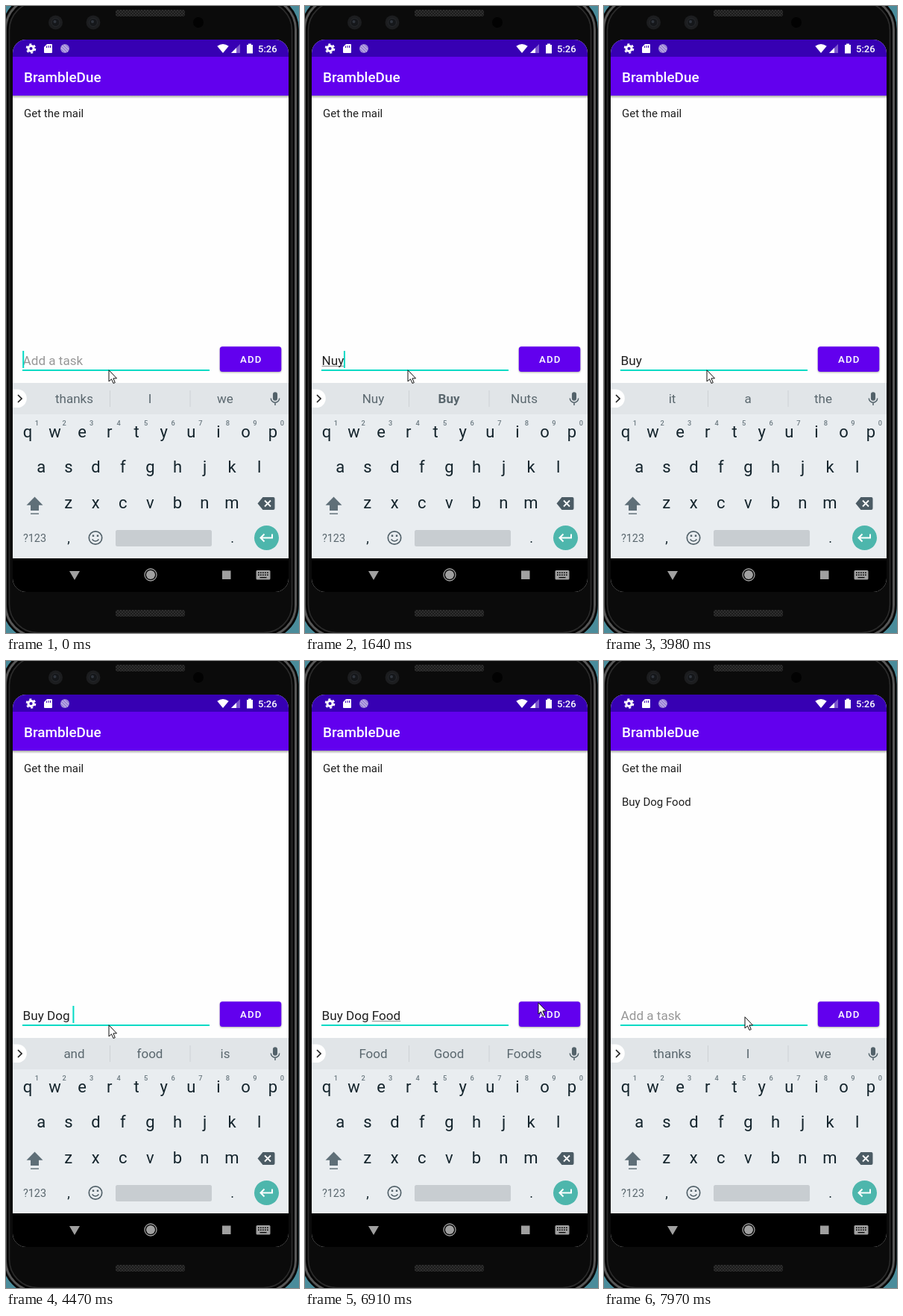
Recreate the animation shown at these times as an HTML page. Size 393 px wide and 840 px high, loop 8000 ms.

```html
<!DOCTYPE html>
<html lang="en">
<head>
<meta charset="utf-8">
<title>Task list</title>
<style>
  html, body { margin: 0; width: 100%; height: 100%; overflow: hidden; background: #4a8c9b; }
  svg { display: block; width: 100vw; height: 100vh; }
  text { font-family: Roboto, sans-serif; white-space: pre; }
  .mid { text-anchor: middle; }
  .item { font-size: 15px; fill: #1f1f1f; }
  .field { font-size: 17.1px; }
  .sug { font-size: 17px; fill: #5a676e; }
  .key { font-size: 22px; fill: #14242c; }
  .mark { font-size: 18px; fill: #14242c; }
  .digit { font-size: 9.3px; font-weight: 500; fill: #6b7980; }
</style>
</head>
<body>
<svg id="stage" viewBox="0 0 393 840">
  <defs>
    <clipPath id="screen"><rect x="9" y="45" width="370" height="740" rx="18"/></clipPath>
    <clipPath id="btnClip"><rect x="286.8" y="456.2" width="82.5" height="33.8" rx="3.5"/></clipPath>
    <linearGradient id="barShade" x2="0" y2="1">
      <stop offset="0" stop-opacity=".35"/><stop offset="1" stop-opacity="0"/>
    </linearGradient>
    <pattern id="mesh" width="4" height="4" patternUnits="userSpaceOnUse">
      <rect width="4" height="4" fill="#1b1b1b"/>
      <path d="M0 0L4 4M4 0L0 4" stroke="#343434" stroke-width=".8"/>
    </pattern>
  </defs>

  <!-- phone body -->
  <rect width="393" height="840" fill="#4a8c9b"/>
  <g stroke-width="1.5">
    <rect x="-4" y="-14" width="396" height="862" rx="45" fill="#0b0b0b" stroke="#050505"/>
    <rect x="-.5" y="-10.5" width="389" height="855" rx="42" fill="none" stroke="#565656" stroke-width="3"/>
    <rect x="2" y="-8" width="384" height="850" rx="40" fill="none" stroke="#000"/>
    <rect x="4.5" y="-5.5" width="379" height="845" rx="38" fill="none" stroke="#2c2c2c"/>
  </g>
  <rect x="147" y="5" width="93" height="9" rx="3" fill="url(#mesh)"/>
  <rect x="147" y="809" width="93" height="9" rx="3" fill="url(#mesh)"/>
  <g id="lenses"></g>
  <circle cx="258" cy="22" r="7" fill="#020202"/>

  <g clip-path="url(#screen)">
    <rect x="9" y="45" width="370" height="740" fill="#fefefe"/>
    <rect x="9" y="120" width="370" height="4" fill="url(#barShade)"/>
    <rect x="9" y="45" width="370" height="23" fill="#3700b3"/>
    <rect x="9" y="68" width="370" height="52" fill="#6200ee"/>

    <!-- status bar -->
    <g fill="#fff">
      <circle cx="33.5" cy="57" r="3.6" fill="none" stroke="#fff" stroke-width="3"/>
      <circle cx="33.5" cy="57" r="5.8" fill="none" stroke="#fff" stroke-width="2" stroke-dasharray="3.04 3.04"/>
      <path d="M55 51h6q1 0 1 1v10q0 1-1 1h-9q-1 0-1-1V55z"/>
      <path d="M54.5 53.5v2.5M57 53v3M59.5 53v3" stroke="#3700b3"/>
      <circle cx="79" cy="57" r="6" fill="#9c86d6"/>
      <path d="M75 53l8 8M74 56l6 6M78 52l6 6" stroke="#cabdec" stroke-width="1"/>
      <path d="M291 63L283.3 53.8Q291 48 298.7 53.8z"/>
      <path d="M302 63L314 51V63z" opacity=".35"/>
      <path d="M302 63L309 56V63z"/>
      <path d="M325 50.5h4v1.5h2v11.5h-8V52h2z"/>
      <text x="338" y="61.5" font-size="13" font-weight="500">5:26</text>
    </g>
    <text x="24" y="102" font-size="18.9" font-weight="500" fill="#fff">BrambleDue</text>

    <!-- list and form -->
    <text class="item" x="24" y="149">Get the mail</text>
    <text class="item" x="24" y="194" id="added">Buy Dog Food</text>
    <rect x="22" y="487" width="251" height="2" fill="#03dac5"/>
    <text class="field" x="22.6" y="480.5" id="field"></text>
    <rect id="compose" y="482" height="1" fill="#333" opacity=".55"/>
    <rect id="caret" y="462" width="2" height="23" fill="#03dac5"/>
    <rect id="btn" x="286.8" y="456.2" width="82.5" height="33.8" rx="3.5" fill="#6200ee"/>
    <g clip-path="url(#btnClip)"><circle id="ripple" cx="313" cy="460" fill="#fff"/></g>
    <text x="314" y="478" font-size="13.2" font-weight="500" letter-spacing="1.15" fill="#fff">ADD</text>

    <!-- keyboard -->
    <rect x="9" y="505" width="370" height="235" fill="#e9edf0"/>
    <rect x="9" y="505" width="370" height="42" fill="#e1e5e8"/>
    <path d="M139.5 515v22M247 515v22" stroke="#cdd2d5"/>
    <path d="M9 513.5h6.5a12.3 12.3 0 0 1 0 24.6H9z" fill="#fff"/>
    <path d="M16 521l5 5-5 5" fill="none" stroke="#222" stroke-width="1.7"/>
    <g id="sugs"></g>
    <g fill="none" stroke="#53626a" stroke-width="1.5">
      <rect x="358.7" y="518" width="4.6" height="10" rx="2.3" fill="#53626a"/>
      <path d="M355.3 525.5a5.7 5.7 0 0 0 11.4 0M361 531v4"/>
    </g>
    <g id="keys"></g>
    <g id="shift">
      <path d="M38.5 657.5L49.5 668.8H44V676H33V668.8H27.5z"/>
      <rect x="33" y="679.5" width="11" height="1.5" fill="#66757d"/>
    </g>
    <path d="M344.5 658H358.5Q360.5 658 360.5 660V673Q360.5 675 358.5 675H344.5L337.5 666.5z" fill="#4b5b64"/>
    <path d="M347 662.5l8 8M355 662.5l-8 8" stroke="#fff" stroke-width="1.8"/>
    <text class="mid" x="38.5" y="718" font-size="14.4" fill="#5a676e">?123</text>
    <text class="mark mid" x="84" y="719">,</text>
    <text class="mark mid" x="303.5" y="719">.</text>
    <g fill="none" stroke="#53626a" stroke-width="1.7">
      <circle cx="120" cy="712.5" r="8.7"/>
      <path d="M115.5 714.5q4.500 5 9 0"/>
      <path d="M117 708.5v2.6M123 708.5v2.6" stroke-width="2.4"/>
    </g>
    <rect x="147" y="702" width="129" height="22" rx="2.5" fill="#c8cdd1"/>
    <circle cx="349.5" cy="712.5" r="16.5" fill="#4db6ac"/>
    <path d="M357 707.5v5H342M346.5 707.5l-5 5 5 5" fill="none" stroke="#fff" stroke-width="2"/>

    <!-- navigation -->
    <rect x="9" y="740" width="370" height="45"/>
    <g fill="#a0a0a0">
      <path d="M85 757H99L92 769z"/>
      <circle cx="194" cy="762" r="6"/>
      <circle cx="194" cy="762" r="8" fill="none" stroke="#a0a0a0" stroke-width="1.3"/>
      <rect x="290" y="756.5" width="11.5" height="11.5"/>
      <rect x="335.5" y="756" width="19" height="12.5" rx="1.5"/>
      <path d="M338 759.3h14M338 762.3h14" stroke="#000" stroke-width="1.5" stroke-dasharray="1.7 1.3"/>
      <path d="M340.5 765.7h9" stroke="#000" stroke-width="1.3"/>
    </g>
  </g>
  <path id="pointer" d="M0 .8V16L3.5 12.8L6 18.5L8.3 17.5L5.9 11.9H10.5z" fill="#fff" stroke="#111"/>
</svg>
<script>
const LOOP = 8000, TEXT_X = 22.6;
const $ = id => document.getElementById(id);

function add(parent, tag, attrs, text) {
  const el = document.createElementNS('http://www.w3.org/2000/svg', tag);
  for (const k in attrs) el.setAttribute(k, attrs[k]);
  if (text) el.textContent = text;
  $(parent).appendChild(el);
  return el;
}
function set(id, attrs) {
  for (const k in attrs) $(id).setAttribute(k, attrs[k]);
}

for (const x of [66.5, 117]) {
  add('lenses', 'circle', { cx: x, cy: 22, r: 9.5, fill: '#1c1d1f' });
  add('lenses', 'circle', { cx: x, cy: 22, r: 5.5, fill: '#15171a', stroke: '#27292d' });
  add('lenses', 'circle', { cx: x - 1, cy: 21, r: 2, fill: '#30353d' });
}

const sugs = [91.5, 193, 294].map(x => add('sugs', 'text', { class: 'sug mid', x, y: 532 }));

const keys = [];
[['qwertyuiop', 29, 578], ['asdfghjkl', 47.3, 625], ['zxcvbnm', 83.7, 672.5]].forEach(([row, x0, y], r) => {
  [...row].forEach((ch, i) => {
    const x = x0 + i * 36.55;
    keys.push({ ch, y, el: add('keys', 'text', { class: 'key mid', x, y }, ch) });
    if (!r) add('keys', 'text', { class: 'digit mid', x: x + 12.5, y: 562 }, String((i + 1) % 10));
  });
});

// [start, typed text]
const typing = [
  [0, ''], [1180, 'N'], [1400, 'Nu'], [1560, 'Nuy'], [1930, 'Nu'], [2200, 'N'], [2820, ''],
  [3060, 'B'], [3390, 'Buy'], [3450, 'Buy '],
  [4170, 'Buy D'], [4240, 'Buy Do'], [4320, 'Buy Dog'], [4470, 'Buy Dog '],
  [4840, 'Buy Dog F'], [4990, 'Buy Dog Fo'], [5130, 'Buy Dog Foo'], [5220, 'Buy Dog Food'], [7090, '']
];
// [start, three suggestions, middle one bold]
const hints = [
  [0, 'thanks I we'], [1240, 'N No Not', 1], [1480, 'Nu Nut Null'], [1640, 'Nuy Buy Nuts', 1],
  [2010, 'Nu Nut Null'], [2290, 'N No Not', 1], [2870, 'thanks I we'], [3060, 'B But By', 1],
  [3390, 'Buy By Bye'], [3450, 'it a the'], [4170, 'D Do Day', 1], [4240, 'Do Dog Don'],
  [4390, 'Dog Dogs Does'], [4470, 'and food is'], [4840, 'F For Food', 1], [5060, 'Fo For Foot', 1],
  [5130, 'Foo Food Foot', 1], [5290, 'Food Good Foods'], [7090, 'thanks I we']
];
const caretOff = [[530, 970], [2700, 2820], [3980, 4170], [5760, 6260], [6730, 7090], [7590, 8000]];

const pick = (list, t) => list.filter(e => e[0] <= t).pop();
const within = (t, a, b) => t >= a && t < b;
const ramp = (t, a, b) => Math.min(1, Math.max(0, (t - a) / (b - a)));
const smooth = p => p * p * (3 - 2 * p);

const ctx = document.createElement('canvas').getContext('2d');
function width(s) {
  ctx.font = '17.1px Roboto, sans-serif';
  return ctx.measureText(s).width;
}

function render(t) {
  const typed = pick(typing, t)[1];
  $('field').textContent = typed || 'Add a task';
  set('field', { fill: typed ? '#1f1f1f' : '#979797' });

  const word = typed.split(' ').pop();
  const end = width(typed), start = end - width(word);
  set('compose', { x: TEXT_X + start, width: end - start });
  set('caret', { x: 22.2 + end, opacity: caretOff.some(([a, b]) => within(t, a, b)) ? 0 : 1 });

  const [, words, bold] = pick(hints, t);
  words.split(' ').forEach((w, i) => {
    sugs[i].textContent = w;
    sugs[i].setAttribute('font-weight', bold && i === 1 ? 700 : 400);
  });

  const upper = within(t, 1120, 1180);
  for (const k of keys) {
    k.el.textContent = upper ? k.ch.toUpperCase() : k.ch;
    k.el.setAttribute('y', k.y + (upper ? 2 : 0));
  }
  set('shift', { fill: upper ? '#4db6ac' : '#5f6f78' });

  set('added', { opacity: t >= 7090 ? 1 : 0 });

  const press = ramp(t, 7030, 7110) * (1 - ramp(t, 7200, 7450));
  set('ripple', { r: 15 + 60 * ramp(t, 7030, 7250), opacity: 0.22 * press });
  $('btn').style.filter = `drop-shadow(0 ${1 + press}px ${1 + press}px rgba(0,0,0,.33))`;

  const go = smooth(ramp(t, 6290, 6730));
  const backX = smooth(ramp(t, 7300, 7970)), backY = smooth(ramp(t, 7300, 7700));
  const x = Math.round(138 + 175 * go - 124 * backX);
  const y = Math.round(487 - 30 * go + 19 * backY);
  set('pointer', { transform: `translate(${x} ${y})` });
}

const t0 = performance.now();
function tick() {
  render((performance.now() - t0) % LOOP);
  requestAnimationFrame(tick);
}
tick();
</script>
</body>
</html>
```
